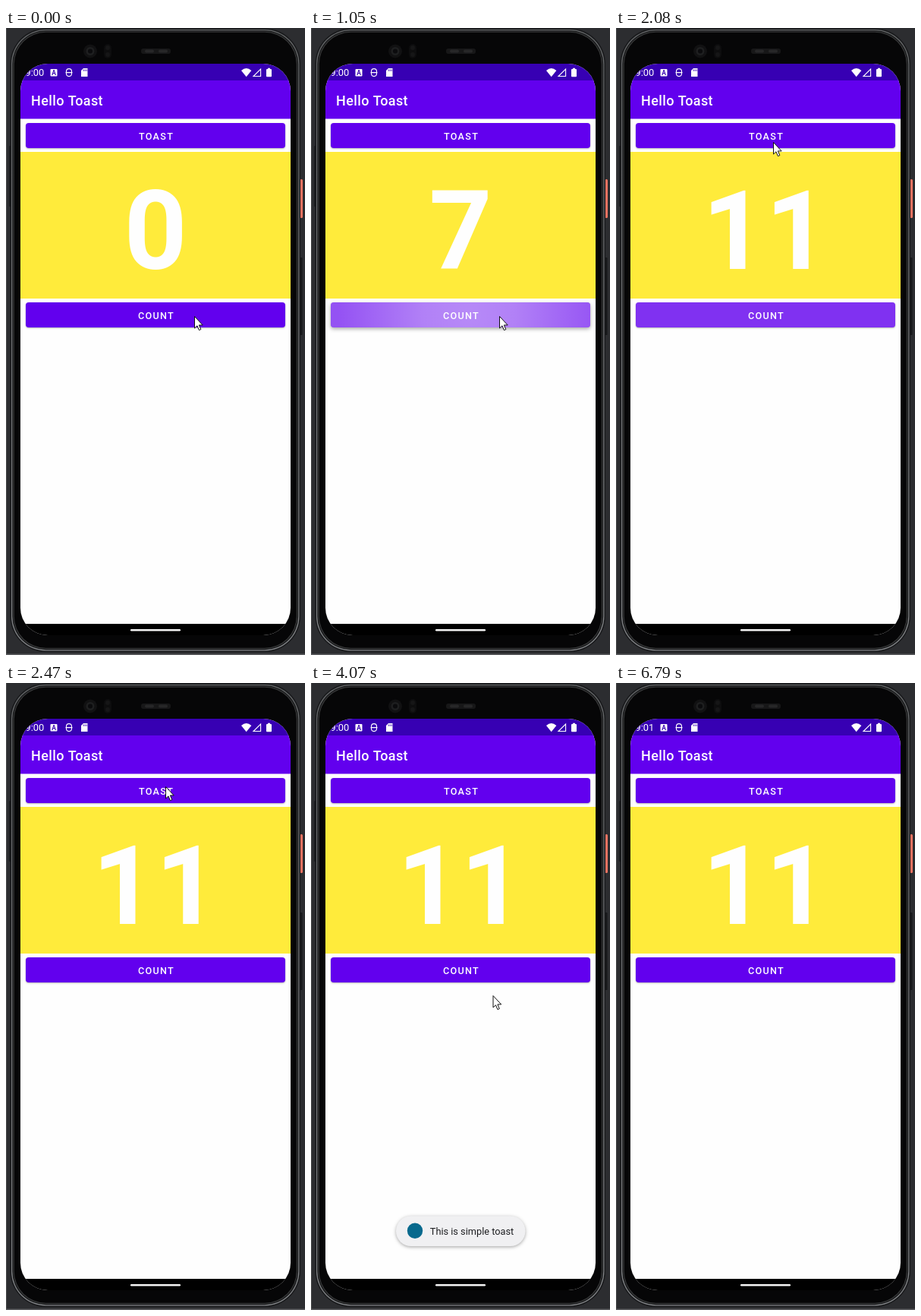
These frames come from a looping animation (394x825 px, 8730 ms). An HTML page with a canvas:

```html
<!DOCTYPE html>
<html lang="en">
<head>
<meta charset="utf-8">
<title>Hello Toast</title>
<style>
html, body { margin: 0; width: 100%; height: 100%; overflow: hidden; background: #2c2d30; }
canvas { display: block; width: 394px; height: 825px; }
</style>
</head>
<body>
<canvas id="stage"></canvas>
<script>
const W = 394, H = 825, LOOP = 8730;
const STEP = 131, LEAD = 40;
const CLICK_EVERY = 172, CLICKS = 11;
const WHITE = '#fefefe', PURPLE = '#6200ee', DEEP = '#3700b3', YELLOW = '#ffeb3b';
const canvas = document.getElementById('stage');
const ctx = canvas.getContext('2d');
const scale = window.devicePixelRatio || 1;
canvas.width = W * scale;
canvas.height = H * scale;

// Pointer stops: time, x, y.
const STOPS = [[1810, 248, 379], [2096, 207, 150], [2350, 210, 136], [3600, 210, 136],
  [4060, 239.5, 411], [6350, 239.5, 408], [6550, 294, 472], [6680, 58, 607]];

const clamp = v => Math.max(0, Math.min(1, v));
const ramp = (t, a, b) => clamp((t - a) / (b - a));
const mix = (a, b, u) => a + (b - a) * u;
const easeOut = u => 1 - (1 - u) ** 2;

function pointerAt(t) {
  const next = STOPS.findIndex(stop => stop[0] > t);
  if (next === 0) return STOPS[0].slice(1);
  if (next < 0) return STOPS[STOPS.length - 1].slice(1);
  const [a, ax, ay] = STOPS[next - 1], [b, bx, by] = STOPS[next];
  const u = easeOut(ramp(t, a, b));
  return [mix(ax, bx, u), mix(ay, by, u)];
}

function rounded(x, y, w, h, r) {
  ctx.beginPath();
  ctx.roundRect(x, y, w, h, r);
}

function box(x, y, w, h, color, r = 0) {
  rounded(x, y, w, h, r);
  ctx.fillStyle = color;
  ctx.fill();
}

function disc(x, y, r, color) {
  ctx.beginPath();
  ctx.arc(x, y, r, 0, Math.PI * 2);
  ctx.fillStyle = color;
  ctx.fill();
}

function poly(points, color) {
  ctx.beginPath();
  points.forEach(([x, y]) => ctx.lineTo(x, y));
  ctx.closePath();
  ctx.fillStyle = color;
  ctx.fill();
}

function label(str, x, y, size, weight, { color = WHITE, align = 'left', spacing = 0 } = {}) {
  ctx.font = `${weight} ${size}px Roboto, sans-serif`;
  ctx.letterSpacing = spacing + 'px';
  ctx.textAlign = align;
  ctx.fillStyle = color;
  ctx.fillText(str, x, y);
}

function withShadow(blur, dy, alpha, draw) {
  ctx.save();
  ctx.shadowColor = `rgba(0,0,0,${alpha})`;
  ctx.shadowBlur = blur * scale;
  ctx.shadowOffsetY = dy * scale;
  draw();
  ctx.restore();
}

function drawDevice() {
  box(0, 0, W, H, '#2c2d30');
  box(0, 0, 1, H, '#4b4c4e');
  box(0, 823.5, W, 1.5, '#5c5e60');
  box(387.5, 302, 3, 102, '#17181a', 1);
  box(387.5, 199, 3.5, 51, '#ef7362', 1.5);
  box(4, 155, 2.5, 80, '#1b1c1e', 1);

  // Nested rims, from the outer metal edge to the glass.
  const metal = ctx.createLinearGradient(0, 0, 0, H);
  metal.addColorStop(0, '#636567');
  metal.addColorStop(1, '#828487');
  [['#17181a', 0], [metal, 1.5], ['#1a1b1c', 2.8], ['#3a3b3c', 4.3], ['#060607', 5.3]]
    .forEach(([color, d]) => box(5.5 + d, .5 + d, 382.5 - 2 * d, 820.5 - 2 * d, color, 47 - d));

  disc(111, 30.5, 9, '#111112');
  disc(111, 30.5, 5.5, '#1e1f20');
  disc(111, 30.5, 3, '#0b0b0d');
  box(129, 21, 10, 19, '#0d0d0e', 5);
  for (const y of [26, 35]) disc(134, y, 3, '#161617');
  box(178, 27, 39, 7, '#171718', 3);
  for (const x of [183, 201]) box(x, 28.5, 12, 4, '#272728', 2);
}

function drawStatus(t) {
  box(19, 47, 356, 22.5, DEEP);
  label(t < 4320 ? '9:00' : '9:01', 25.5, 63.2, 12.9, 400);

  box(58.5, 54, 9, 9.5, WHITE, 1);
  label('A', 63, 62, 8.5, 700, { color: DEEP, align: 'center' });

  ctx.strokeStyle = WHITE;
  ctx.lineWidth = 1.1;
  rounded(79.5, 53.6, 7, 10, 3.5);
  ctx.moveTo(78.5, 58.6);
  ctx.lineTo(87.5, 58.6);
  ctx.stroke();

  poly([[102, 53], [107.5, 53], [107.5, 64], [99, 64], [99, 56]], WHITE);
  for (let i = 0; i < 3; i++) box(101.7 + 2 * i, 54.5, .9, 2.2, DEEP);

  ctx.beginPath();
  ctx.moveTo(316.7, 64.3);
  ctx.lineTo(310, 56);
  ctx.quadraticCurveTo(316.7, 50.2, 323.4, 56);
  ctx.fillStyle = WHITE;
  ctx.fill();

  ctx.beginPath();
  ctx.moveTo(335.6, 54);
  ctx.lineTo(335.6, 63.5);
  ctx.lineTo(326, 63.5);
  ctx.closePath();
  ctx.stroke();

  box(343, 54, 7, 10.3, WHITE, 1);
  box(345, 52.8, 3, 2, WHITE);
}

function drawButton(text, y, { base, peak, x, radius }, lifted) {
  const shape = () => box(26, y, 342, 33, PURPLE, 4);
  if (lifted) withShadow(5, 2, .34, shape);
  else withShadow(2, 1, .28, shape);
  if (peak > 0) {
    const glow = ctx.createRadialGradient(x, y + 17, 0, x, y + 17, radius);
    glow.addColorStop(0, `rgba(255,255,255,${peak})`);
    glow.addColorStop(.35, `rgba(255,255,255,${mix(base, peak, .85)})`);
    glow.addColorStop(1, `rgba(255,255,255,${base})`);
    box(26, y, 342, 33, glow, 4);
  }
  label(text, 198, y + 21.5, 12.6, 500, { align: 'center', spacing: 1.3 });
}

// Rapid clicks pile up ripples, which then fade together.
function countWash(t) {
  const base = t < 1810 ? .32 * clamp(t / 900) ** 1.2 : .4 * (1 - ramp(t, 1810, 2470)) ** 1.3;
  const glow = .22 * ramp(t, 0, 120) * (1 - ramp(t, 1660, 2080));
  return { base, peak: base + glow, x: mix(222, 208, ramp(t, 390, 1050)), radius: Math.min(172, 70 + .15 * t) };
}

function toastWash(t) {
  const base = .13 * ramp(t, 2500, 2860) * (1 - ramp(t, 3000, 3250));
  const glow = .14 * ramp(t, 2500, 2620) * (1 - ramp(t, 2740, 3000));
  return { base, peak: base + glow, x: 205, radius: 70 + Math.max(0, t - 2620) * .6 };
}

function drawToast(t) {
  const alpha = ramp(t, 2680, 2880) * (1 - ramp(t, 4900, 5100));
  if (alpha <= 0) return;
  ctx.save();
  ctx.globalAlpha = alpha;
  withShadow(4, 1.3, .34, () => box(112, 701.3, 170.5, 39.7, '#f0f0f2', 19.8));
  disc(137, 720.8, 10.2, '#07698d');
  label('This is simple toast', 156.8, 725.7, 12.75, 400, { color: '#1d1e21' });
  ctx.restore();
}

function drawPointer(t) {
  if (t >= 6800) return;
  ctx.save();
  ctx.translate(...pointerAt(t));
  poly([[.5, .5], [.5, 16], [4, 12.8], [6.4, 18.6], [8.8, 17.6], [6.4, 11.9], [11.2, 11.9]], '#fff');
  ctx.strokeStyle = '#111';
  ctx.lineWidth = 1;
  ctx.lineJoin = 'round';
  ctx.stroke();
  ctx.restore();
}

function drawScreen(t) {
  ctx.save();
  rounded(19, 47, 356, 752, 36);
  ctx.clip();
  box(19, 47, 356, 752, WHITE);
  drawStatus(t);
  box(19, 69, 356, 50.5, PURPLE);
  label('Hello Toast', 33, 101.6, 18, 500, { spacing: .38 });
  drawButton('TOAST', 125, toastWash(t), t >= 2620 && t < 2860);
  box(19, 163, 356, 193, YELLOW);
  const count = Math.min(CLICKS, Math.ceil(t / CLICK_EVERY));
  label(String(count), 197, 317.2, 145, 700, { align: 'center' });
  drawButton('COUNT', 361, countWash(t), t >= 120 && t < 1930);
  drawToast(t);
  box(19, 784, 356, 15, '#000');
  box(164, 791, 66, 2.4, '#f4f4f4', 1.2);
  ctx.restore();
}

function frame() {
  const now = performance.now() % LOOP;
  const t = Math.floor((now + LEAD) / STEP) * STEP;
  ctx.setTransform(scale, 0, 0, scale, 0, 0);
  drawDevice();
  drawScreen(t);
  drawPointer(t);
  requestAnimationFrame(frame);
}
frame();
</script>
</body>
</html>
```
